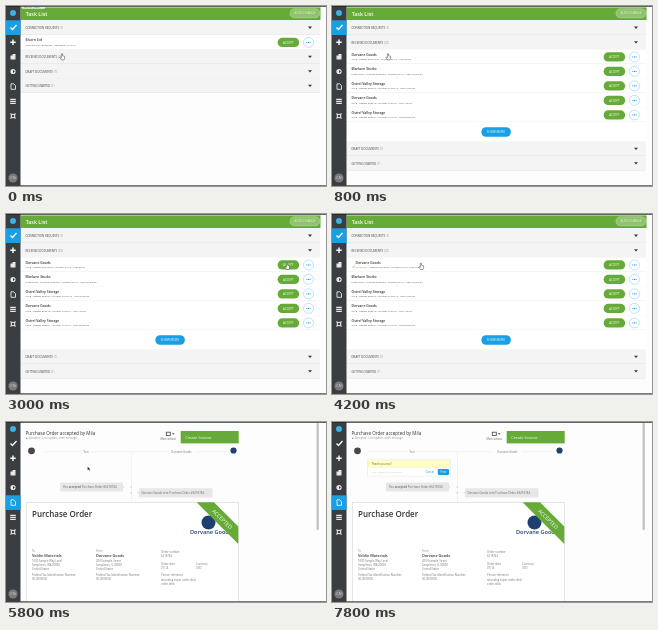
Write an HTML page that moves like this. It is 320 px wide and 180 px high and loops after 8 s.

```html
<!DOCTYPE html>
<html lang="en">
<head>
<meta charset="utf-8">
<title>Task list</title>
<style>
html, body { margin: 0; width: 100%; height: 100%; overflow: hidden; background: #fdfdfd; }
svg { display: block; width: 100vw; height: 100vh; font-family: "Open Sans", sans-serif; }
</style>
</head>
<body>
<svg id="stage" viewBox="0 0 320 180" preserveAspectRatio="none"></svg>
<script>
const LOOP = 8000, STEP = 200;
const GREEN = '#66ab37', BLUE = '#1a9fe3', DARK = '#3b3e40', INK = '#333', NAVY = '#203f71';
const stage = document.getElementById('stage');

const rect = (x, y, w, h, fill, extra = '') =>
  `<rect x="${x}" y="${y}" width="${w}" height="${h}" fill="${fill}" ${extra}/>`;
const text = (x, y, size, str, fill = INK, extra = '') =>
  `<text x="${x}" y="${y}" font-size="${size}" fill="${fill}" ${extra}>${str}</text>`;
const path = (d, fill, stroke = 'none', width = 1) =>
  `<path d="${d}" fill="${fill}" stroke="${stroke}" stroke-width="${width}"/>`;
const circle = (x, y, r, fill, extra = '') =>
  `<circle cx="${x}" cy="${y}" r="${r}" fill="${fill}" ${extra}/>`;
const group = (id, body) => `<g id="${id}">${body}</g>`;
const MID = 'text-anchor="middle"', BOLD = 'font-weight="600"';

function sidebar() {
  const icons = [
    path('M4.5 21.5l2 2 4-4.5', 'none', '#fff', 1.3),
    path('M7 33.5v5.4M4.3 36.2h5.4', 'none', '#fff', 1.4),
    path('M4.5 49.5h2v-1.5h3v5.5h-5z', '#e8e8e8'),
    circle(7, 65.5, 2.6, '#e8e8e8') + path('M7 64l2 1.5-2 1.5z', DARK),
    path('M5 77.8h2.7l1.8 1.8v3.7h-4.5z', 'none', '#fff', .8),
    path('M4.2 93.3h5.6M4.2 95.3h5.6M4.2 97.3h5.6', 'none', '#e8e8e8', 1.2),
    circle(7, 110, 1.8, 'none', 'stroke="#e8e8e8" stroke-width="1.1"') +
      path('M4.5 107.5l1.5 1.5M9.5 107.5l-1.5 1.5M4.5 112.5l1.5-1.5M9.5 112.5l-1.5-1.5', 'none', '#e8e8e8', 1.1)
  ];
  return rect(0, 0, 14.5, 180, DARK) + `<rect id="active" width="14.5" height="14.7" fill="${BLUE}"/>` +
    circle(7, 7, 3, '#35b4ea') + icons.join('') +
    circle(7, 172, 4.6, '#777b7d') + text(7, 173.4, 3.8, 'CN', '#ddd', MID);
}

const section = (y, label, count) =>
  rect(14.5, y, 299.5, 14.5, '#f4f4f4') + rect(14.5, y + 14.2, 299.5, .4, '#dcdcdc') +
  text(19.5, y + 8.6, 2.9, `${label} <tspan fill="#999">(${count})</tspan>`, '#444') +
  path(`M302 ${y + 6.3}h4l-2 2.4z`, INK);

const rowButtons = y =>
  rect(271.6, y + 2.9, 21.6, 9.2, GREEN, 'rx="4.6"') +
  text(282.4, y + 8.6, 3, 'ACCEPT', '#fff', MID) +
  circle(302.5, y + 7.5, 5, '#fff', 'stroke="#8fd0f1" stroke-width=".6"') +
  [-1.6, 0, 1.6].map(d => circle(302.5 + d, y + 7.5, .55, BLUE)).join('');

const rowText = (y, name, detail, x = 19.5) =>
  text(x, y + 6.4, 3.4, name, INK, BOLD) + text(x, y + 10.9, 2.45, detail, '#444');

const row = (y, name, detail) =>
  rect(14.5, y, 299.5, 14.5, '#fff') + rect(14.5, y + 14.2, 299.5, .4, '#e6e6e6') +
  rowText(y, name, detail) + rowButtons(y);

const header = rect(14.5, 1.4, 300, 12.7, GREEN) +
  text(19.7, 9.6, 5.3, 'Task List', '#fff', BOLD) +
  rect(284, 2.8, 29.8, 8.9, '#91c36d', 'rx="4.4" stroke="#c3e0ad" stroke-width=".5"') +
  text(299, 8.3, 3, 'AUTO CHANGE', '#e2f0d6', MID);

const closedList = section(14.3, 'CONNECTION REQUESTS', 1) +
  row(28.9, 'Elvorn Ltd', 'CONNECTION REQUEST - RECEIVED: 7/14/16') +
  section(43.4, 'RECEIVED DOCUMENTS', 20) + section(57.9, 'DRAFT DOCUMENTS', 1) +
  section(72.4, 'GETTING STARTED', 1) +
  rect(16, 0, 23, 2.8, '#e6eedf', 'rx="1"') + text(18, 2.3, 2.2, 'Task list - Inbox', '#667');

const names = ['Dorvane Goods', 'Marlune Studio', 'Ostrel Valley Storage', 'Dorvane Goods', 'Ostrel Valley Storage'];
const details = [
  'SALE - ORDER #6218744 - ISSUED: 07/14 - USD 30.00',
  'PURCHASE - INVOICE #045182 - ISSUED: 07/10 - USD 24,000.00',
  'SALE - ORDER #09727 - ISSUED: 07/07/16 - USD 2,500.00',
  'SALE - ORDER #09618 - ISSUED: 7/22/16 - USD 175.00',
  'SALE - ORDER #09181 - ISSUED: 7/15/16 - USD 33,000.00'
];
const openList = section(14.3, 'CONNECTION REQUESTS', 1) + section(28.9, 'RECEIVED DOCUMENTS', 20) +
  names.map((name, i) => row(43.4 + i * 14.5, name, details[i])).join('') +
  rect(14.5, 115.9, 299.5, 19.5, '#fff') +
  rect(149.3, 121.2, 29.6, 9.6, BLUE, 'rx="4.8"') + text(164, 127.1, 3, 'SHOW MORE', '#fff', MID) +
  section(135.4, 'DRAFT DOCUMENTS', 1) + section(149.9, 'GETTING STARTED', 1);

const acceptedRow = rect(15, 44, 100, 13, '#fff') +
  rowText(43.4, names[0], '<tspan fill="#66ab37">ACCEPTED</tspan> - ORDER #6218744 - ISSUED: 07/14 - USD 30.00', 23.5) +
  path('M20.3 52.5l1 1 1.6-2', 'none', GREEN, .6);

const loading =
  rect(0, 175.7, 106.5, 4.3, '#e9e9e9', 'stroke="#aaa" stroke-width=".4"') +
  text(1, 178.8, 2.5, 'Waiting for response from the sandbox...', '#444');

const lines = (x, y, list) => list.map((s, i) => text(x, y + i * 4.3, 2.75, s, '#777')).join('');

const party = (x, label, name, address) =>
  text(x, 130.3, 2.6, label, '#888') + text(x, 134.8, 3.8, name, INK, BOLD) + lines(x, 139.5, address) +
  lines(x, 154.1, ['Federal Tax Identification Number:', '00-0000000']);

const documentPage =
  text(19.5, 12.7, 4.55, 'Purchase Order accepted by Mila') +
  circle(20.7, 16.2, .8, GREEN) + text(23, 17.2, 2.65, 'Accepted - Last update: order message', '#999') +
  rect(160.3, 10.2, 4, 3.2, 'none', 'stroke="#444" stroke-width=".8"') + path('M166 11.3l1.2 1.4 1.2-1.4z', INK) +
  text(162.3, 17.5, 2.6, 'More actions', '#666', MID) +
  rect(174.7, 9, 58, 12.4, GREEN) + text(179.2, 16.5, 4, 'Create Invoice', '#fff') +
  rect(37, 29.7, 183, .4, '#ddd') + rect(125, 30, .4, 50, '#e4e4e4') +
  circle(25.5, 28.8, 3.4, '#4a464c') + circle(227.5, 28.5, 3.1, NAVY) +
  rect(75, 27, 10, 5, '#fdfdfd') + text(80, 31, 2.8, 'You', '#777', MID) +
  rect(161, 27, 29, 5, '#fdfdfd') + text(175.5, 31, 2.8, 'Dorvane Goods', '#777', MID) +
  rect(54, 60.5, 63, 9, '#e7e7e7', 'rx="1"') + path('M117 63.5l2 1.5-2 1.5z', '#e7e7e7') +
  text(57, 66.1, 2.85, 'You <tspan font-weight="600">accepted</tspan> Purchase Order #6218744', '#666') +
  rect(133, 66.2, 73.5, 9.3, '#e7e7e7', 'rx="1"') + path('M133 69.3l-2 1.5 2 1.5z', '#e7e7e7') +
  text(135.5, 71.9, 2.85, 'Dorvane Goods sent Purchase Order #6218744', '#666') +
  circle(125.2, 65, .8, '#ccc') + circle(125.2, 70.8, .8, '#ccc') +
  rect(20.3, 80.3, 212, 110, '#fff', 'stroke="#d5d5d5" stroke-width=".6"') +
  text(26, 94.8, 8, 'Purchase Order', INK, BOLD) +
  circle(202.5, 100.5, 7, NAVY) + text(184, 111.5, 5.6, 'Dorvane Goods', NAVY, BOLD) +
  path('M190.5 80.3h17.5l24.3 24.3v17.5z', GREEN) +
  text(0, 0, 5.3, 'ACCEPTED', '#fff', `${MID} transform="translate(214.8 98.5) rotate(45)"`) +
  party(26, 'To', 'Veldin Materials', ['1000 Sample Way Level', 'Sampleton, WA 00000', 'United States']) +
  party(90, 'From', 'Dorvane Goods', ['200 Example Street', 'Sampleton, IL 00000', 'United States']) +
  lines(155, 130.8, ['Order number', '6218744']) +
  lines(155, 142.8, ['Order date', '07/14']) + lines(190, 142.8, ['Currency', 'USD']) +
  lines(155, 154.3, ['Person reference', 'attending buyer order desk', 'order desk']);

const composer =
  rect(35.5, 37.3, 83, 17, '#fff', 'stroke="#ddd" stroke-width=".4" rx="1"') +
  rect(36.2, 38.4, 81, 7, '#ffffc4', 'stroke="#ece8b0" stroke-width=".3"') +
  text(39.5, 43.3, 2.9, '', '#66644a', 'id="message"') +
  rect(39.3, 40, .4, 3.8, '#8a7a3a', 'id="caret"') +
  text(39, 50.8, 2.5, 'Only visible to participants', '#c4c4c4') +
  text(93.5, 50.9, 2.8, 'Cancel', BLUE) +
  rect(105.8, 47, 11.2, 6, BLUE, 'rx="1"') + text(111.4, 51, 2.8, 'Post', '#fff', MID);

stage.innerHTML = rect(0, 0, 320, 180, '#fdfdfd') +
  group('tasks', header + group('closed', closedList) + group('open', openList) + group('accepted', acceptedRow)) +
  group('document', documentPage + group('composer', composer)) +
  sidebar() + group('loading', loading) +
  rect(310.5, 1, 2.4, 0, '#c4c4c4', 'id="scrollbar" rx="1"') +
  rect(0, 0, 320, .7, '#222') + rect(0, 179.3, 320, .7, '#444') +
  group('hand', path('M-.6-2.2q.6-.6 1.2 0v2l2 .5v2l-.7 1.7h-2.3l-1.8-2.4.5-.5 1.1.7z', '#fff', '#222', .45)) +
  group('arrow', path('M0 0v3.8l.9-.8.7 1.4.7-.3-.7-1.4h1.2z', '#222', '#fff', .2)) +
  group('beam', path('M-.6-1.5q.6 0 .6.6v1.8q0 .6-.6.6M.6-1.5q-.6 0-.6.6v1.8q0 .6.6.6', 'none', '#777', .3));

const $ = id => document.getElementById(id);
const show = (id, on) => $(id).setAttribute('display', on ? 'inline' : 'none');

// time, x, y
const pointerPath = [
  [0, 56, 50], [1400, 56, 50], [2400, 281, 51.5], [3400, 281, 51.5],
  [4200, 89, 51.5], [5000, 89, 50.5], [5400, 89, 50.5], [6000, 79, 42.5], [8000, 79, 42.5]
];

function pointerAt(t) {
  const i = pointerPath.findIndex(p => p[0] > t);
  const [t0, x0, y0] = pointerPath[i - 1], [t1, x1, y1] = pointerPath[i];
  const u = (t - t0) / (t1 - t0), e = u * u * (3 - 2 * u);
  return [x0 + (x1 - x0) * e, y0 + (y1 - y0) * e];
}

function draw(t) {
  const inTasks = t < 5000, loaded = t >= 5600;
  show('tasks', inTasks);
  show('closed', t < 400);
  show('open', t >= 400);
  show('accepted', t >= 3600);
  show('loading', !inTasks && !loaded);
  show('document', loaded);
  show('composer', t >= 6000);
  show('scrollbar', !inTasks);
  $('scrollbar').setAttribute('height', loaded ? 107 : 124);
  $('active').setAttribute('y', inTasks ? 14.3 : 73.3);

  const message = 'Thank you too!';
  const typed = Math.round(message.length * Math.min(1, Math.max(0, (t - 6400) / 1200)));
  $('message').textContent = message.slice(0, typed);
  show('caret', typed === 0);

  const [x, y] = pointerAt(t);
  show('hand', inTasks);
  show('arrow', !inTasks && t < 6000);
  show('beam', t >= 6000 && t < 6800);
  for (const id of ['hand', 'arrow', 'beam']) $(id).setAttribute('transform', `translate(${x} ${y})`);
}

const start = performance.now();
function tick() {
  const t = (performance.now() - start) % LOOP;
  draw(Math.floor(t / STEP) * STEP);
  requestAnimationFrame(tick);
}
tick();
</script>
</body>
</html>
```
